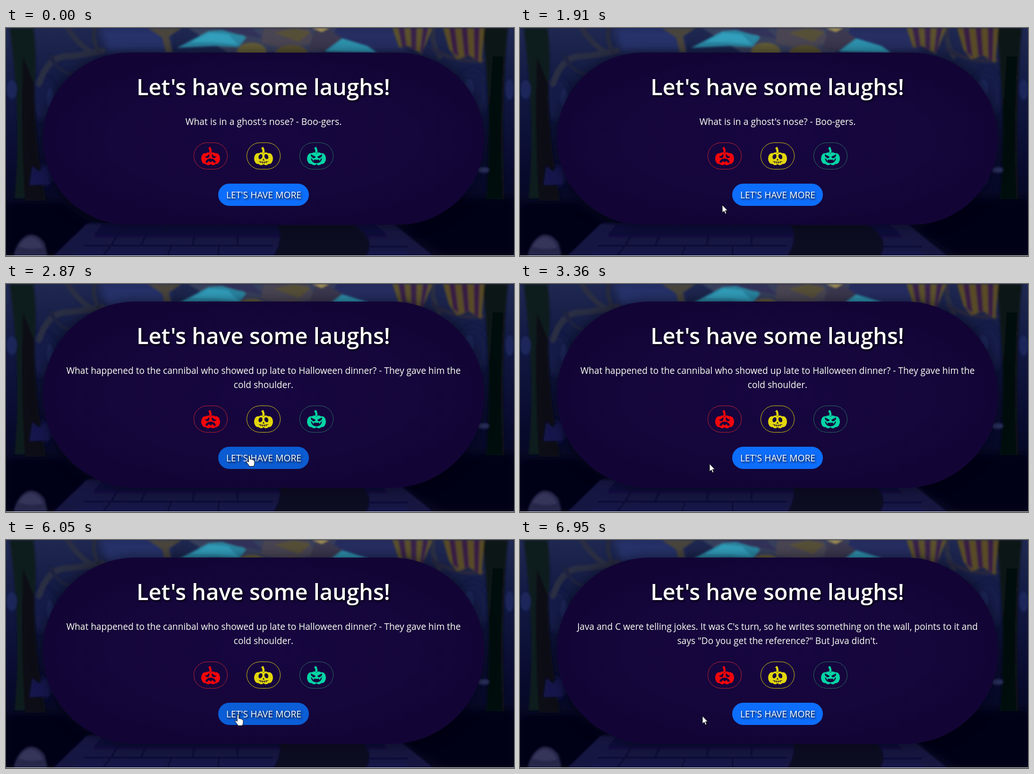
These frames come from a looping animation (1075 px wide and 482 px high, 8000 ms). An HTML page:

```html
<!DOCTYPE html>
<html lang="en">
<head>
<meta charset="utf-8">
<title>Halloween jokes</title>
<style>
html, body { margin: 0; width: 100%; height: 100%; overflow: hidden; background: #08092b; }
svg { display: block; width: 1075px; height: 482px; }
text { font-family: "Open Sans", "Noto Sans", sans-serif; text-anchor: middle; fill: #fff; }
#title { font-size: 47px; font-weight: 600; text-shadow: 2px 2px 4px #000; }
.joke { font-size: 19.1px; fill: #fffff4; }
#label { font-size: 19.3px; text-shadow: 2px 2px 4px #000; }
#panel { filter: drop-shadow(0 0 14px rgba(0, 0, 10, .55)); }
</style>
</head>
<body>
<svg viewBox="0 0 1075 482">
  <defs>
    <linearGradient id="night" x2="0" y2="1">
      <stop offset="0" stop-color="#1f2850"/>
      <stop offset=".3" stop-color="#101740"/>
      <stop offset=".65" stop-color="#080a2c"/>
      <stop offset=".85" stop-color="#05071e"/>
      <stop offset="1" stop-color="#070720"/>
    </linearGradient>
    <linearGradient id="road" x2="0" y2="1">
      <stop offset="0" stop-color="#0f0f38"/>
      <stop offset="1" stop-color="#161549"/>
    </linearGradient>
    <radialGradient id="velvet">
      <stop offset="0" stop-color="#170640"/>
      <stop offset=".7" stop-color="#15063b"/>
      <stop offset="1" stop-color="#120535"/>
    </radialGradient>
    <filter id="soft" x="0" y="0" width="100%" height="100%"><feGaussianBlur stdDeviation="2"/></filter>
    <filter id="haze" x="-20%" y="-20%" width="140%" height="140%"><feGaussianBlur stdDeviation="7"/></filter>
    <g id="pumpkin">
      <path d="M17 13Q19 7 15 3L19 0Q23 6 22 13Z"/>
      <ellipse cx="8.5" cy="25" rx="8.5" ry="11.5"/>
      <ellipse cx="31.5" cy="25" rx="8.5" ry="11.5"/>
      <ellipse cx="15" cy="25.5" rx="9" ry="13.5"/>
      <ellipse cx="25" cy="25.5" rx="9" ry="13.5"/>
    </g>
  </defs>

  <rect width="1075" height="482" fill="url(#night)"/>
  <g filter="url(#haze)">
    <path d="M200 0H345V50H215Z" fill="#26316a"/>
    <path d="M640 0H830L850 52H690Z" fill="#252e62"/>
    <ellipse cx="78" cy="150" rx="26" ry="45" fill="#131b48"/>
    <ellipse cx="988" cy="140" rx="32" ry="50" fill="#141c4a"/>
    <ellipse cx="75" cy="312" rx="24" ry="22" fill="#15164a"/>
    <ellipse cx="962" cy="318" rx="26" ry="22" fill="#141549"/>
    <path d="M0 370H120L190 420L110 482H0Z" fill="#040519"/>
    <path d="M840 425L960 360H1075V482H930Z" fill="#040519"/>
  </g>
  <g filter="url(#soft)">
    <!-- trees -->
    <g fill="none" stroke="#2b2d42" stroke-linecap="round">
      <path d="M70 118Q88 62 125 60T205 48" stroke-width="13"/>
      <path d="M128 -5Q148 32 182 52" stroke-width="11"/>
      <path d="M190 -5Q180 20 196 50" stroke="#252a3c" stroke-width="9"/>
      <path d="M95 60Q110 96 150 100" stroke="#1b2140" stroke-width="8"/>
      <path d="M905 -5Q898 25 918 62" stroke-width="10"/>
      <path d="M905 45Q955 75 1008 68" stroke="#252840" stroke-width="9"/>
    </g>
    <path d="M8 0H58Q66 60 60 120Q58 230 84 360H18Q34 200 8 0Z" fill="#0e1b1d"/>
    <path d="M36 60Q30 200 40 365H84Q60 230 60 120Z" fill="#081115"/>
    <path d="M1008 0H1062Q1048 130 1054 362H1016Q1030 180 1008 0Z" fill="#0a1219"/>
    <path d="M1030 60Q1020 220 1018 362H1050Q1044 200 1052 60Z" fill="#060b10"/>
    <g fill="#1c265a">
      <ellipse cx="12" cy="130" rx="11" ry="20"/>
      <ellipse cx="93" cy="148" rx="7" ry="20"/>
      <ellipse cx="980" cy="128" rx="10" ry="20"/>
      <ellipse cx="1066" cy="130" rx="9" ry="22"/>
      <path d="M50 332L56 292L70 304L86 290L92 330Z" fill="#17184e"/>
      <ellipse cx="1010" cy="300" rx="12" ry="6" fill="#2b305f"/>
    </g>
    <!-- market tents -->
    <path d="M300 0H372L345 18L352 52H338L330 20Z" fill="#49443c"/>
    <path d="M385 0H700L668 52H470Z" fill="#39405c"/>
    <path d="M362 42L428 7L482 3L508 20L492 40L440 38Z" fill="#2b86a3"/>
    <path d="M390 30L430 10L470 14L492 36L440 30Z" fill="#329fbc"/>
    <path d="M440 0H520L545 22L490 14Z" fill="#30315a"/>
    <path d="M545 0H640L655 30L600 45L540 32Z" fill="#4a4552"/>
    <path d="M568 10L610 0L645 8L620 30Z" fill="#575038"/>
    <ellipse cx="520" cy="51" rx="31" ry="20" fill="#635d35"/>
    <ellipse cx="604" cy="54" rx="34" ry="18" fill="#57502f"/>
    <path d="M655 0H680L712 22L672 50L640 44Z" fill="#3a3750"/>
    <path d="M674 50L712 22L765 38L785 52Z" fill="#2f94b0"/>
    <path d="M648 0H684L668 8Z" fill="#a29152"/>
    <path d="M818 0H902L880 55L850 38L832 42Z" fill="#5c512c"/>
    <path d="M830 0H843L848 40H838ZM856 0H869L868 46H858ZM882 0H894L882 52H876Z" fill="#39204a"/>
    <path d="M925 0H1012L1006 74L980 58L955 66L938 45Z" fill="#584c27"/>
    <path d="M938 0H950L958 62L946 52ZM964 0H976L980 58L970 60ZM990 0H1002L1000 70L991 64Z" fill="#391a42"/>
    <!-- road -->
    <path d="M175 412H800L885 482H110Z" fill="url(#road)"/>
    <path d="M170 414L205 414L145 482H100Z" fill="#171842"/>
    <path d="M780 414H820L905 482H860Z" fill="#171740"/>
    <path d="M572 416H735Q785 445 762 482H565Q590 445 572 416Z" fill="#090820"/>
    <path d="M190 432H570M165 460H565M255 414L240 432L222 460L205 482M345 414L335 432M300 432L285 460M400 432L395 460M350 460L342 482M455 414V432M490 432V460M450 460V482M765 436H800M770 462H850"
      fill="none" stroke="#0b0b30" stroke-width="3"/>
    <path d="M16 482Q22 450 45 438Q66 432 82 455L88 482Z" fill="#25264a"/>
    <path d="M26 462Q38 442 55 442Q70 446 78 464Q50 470 26 462Z" fill="#35365a"/>
  </g>

  <rect id="panel" x="78" width="934" fill="url(#velvet)"/>
  <g id="upper">
    <text id="title" x="544.5" y="142">Let's have some laughs!</text>
    <text class="joke" x="545" y="205"></text>
    <text class="joke" x="545" y="235"></text>
  </g>
  <g id="lower">
    <g id="votes"></g>
    <rect id="button" x="449" y="329" width="192" height="47" rx="23.5"/>
    <text id="label" x="545.5" y="360">LET'S HAVE MORE</text>
  </g>
  <path id="cursor" stroke="#000" stroke-width="1" fill="#fff" stroke-linejoin="round"/>
  <rect y="481" width="1075" height="1" fill="#fff"/>
</svg>
<script>
const $ = id => document.getElementById(id);
const DARK = '#16073d';

const faces = [
  ['#f2060a', '#c3212d', `<path d="M8 21Q14 20 17 15Q19 22 14 24Q10 24 8 21ZM32 21Q26 20 23 15Q21 22 26 24Q30 24 32 21Z"/>
    <path d="M9 33Q11 25 20 25Q29 25 31 33L27 34L24 30L20 33L16 30L13 34Z"/>`],
  ['#e2d70c', '#dcc80e', `<ellipse cx="13.5" cy="21" rx="4" ry="5.5" transform="rotate(20 13.5 21)"/>
    <ellipse cx="26" cy="21" rx="4" ry="5.5" transform="rotate(-20 26 21)"/><path d="M20 25L22 29H18Z"/>
    <path d="M10 31Q20 35 30 31M14 30V35M18 31V36M22 31V36M26 30V35" fill="none" stroke="${DARK}"/>`],
  ['#05d5a5', '#26705f', `<path d="M8 16L18 21Q17 25 13 24Q8 22 8 16ZM32 16L22 21Q23 25 27 24Q32 22 32 16Z"/>
    <path d="M8 24L11 26L13 30L15 27Q20 28 25 27L27 30L29 26L32 24Q30 35 20 35Q10 35 8 24Z"/>`]
];
$('votes').innerHTML = faces.map(([color, ring, face], i) => `
  <g transform="translate(${397 + 112 * i} 242)">
    <rect x=".5" y=".5" width="71" height="56" rx="28" fill="none" stroke="${ring}"/>
    <g transform="translate(16 9)"><use href="#pumpkin" fill="${color}"/><g fill="${DARK}">${face}</g></g>
  </g>`).join('');

const LOOP = 8000;
// each joke arrives a moment after the press
const jokes = [
  [0, "What is in a ghost's nose? - Boo-gers.", ''],
  [2870, 'What happened to the cannibal who showed up late to Halloween dinner? - They gave him the', 'cold shoulder.'],
  [6550, "Java and C were telling jokes. It was C's turn, so he writes something on the wall, points to it and",
    'says "Do you get the reference?" But Java didn\'t.']
];
const hovers = [[1993, 3136], [5771, 6742]];
const presses = [[2700, 2780], [6380, 6460]];
// pointer stops: time, x, y
const stops = [
  [1070, 360, 484], [1480, 428, 374], [1910, 428, 374], [2300, 515, 362], [2950, 515, 362],
  [3360, 401, 380], [5570, 401, 380], [6050, 491, 369], [6640, 491, 369], [6950, 386, 372], [LOOP, 386, 372]
];
const ARROW = 'M0 0V16.5L3.8 13L6.4 19L9 18L6.5 12H11.5Z';
const HAND = 'M-1.8 1Q0 -1 1.8 1V8.5Q5 7.5 5.5 9.5Q8 8.5 8.5 10.5Q11 10 11 12.5V17Q11 20 9 23.5H0Q-2 19 -6 15Q-6.5 12 -4 12.5L-1.8 14.5Z';
const [line1, line2] = document.querySelectorAll('.joke');

const clamp = v => Math.min(1, Math.max(0, v));
const mix = (a, b, u) => a + (b - a) * u;

// 150 ms fade in and out around each span
const fade = (spans, t) =>
  spans.reduce((sum, [on, off]) => sum + clamp((t - on) / 150) - clamp((t - off) / 150), 0);

function pointer(t) {
  const i = stops.findIndex(s => s[0] > t);
  if (i < 1) return [360, 500];
  const [a, b] = [stops[i - 1], stops[i]];
  const u = ((t - a[0]) / (b[0] - a[0])) ** .75, e = u * u * (3 - 2 * u);
  return [mix(a[1], b[1], e), mix(a[2], b[2], e)];
}

function draw(t) {
  const [, first, second] = jokes.filter(j => j[0] <= t).pop();
  const shift = second ? 15 : 0;
  line1.textContent = first;
  line1.style.fontSize = second ? '' : '19.3px';
  line2.textContent = second;
  $('upper').setAttribute('transform', `translate(0 ${-shift})`);
  $('lower').setAttribute('transform', `translate(0 ${shift})`);
  $('panel').setAttribute('y', 52 - shift);
  $('panel').setAttribute('height', 364 + 2 * shift);
  $('panel').setAttribute('rx', 182 + shift);

  const glow = fade(hovers, t), push = fade(presses, t);
  $('button').setAttribute('fill',
    `rgb(${13 - 2 * glow - push} ${110 - 16 * glow - 6 * push} ${253 - 38 * glow - 13 * push})`);

  const over = hovers.some(([on, off]) => t >= on && t < off);
  const [x, y] = pointer(t).map(Math.round);
  $('cursor').setAttribute('d', over ? HAND : ARROW);
  $('cursor').setAttribute('transform', `translate(${x} ${y})`);
}

const start = performance.now();
function tick() {
  draw((performance.now() - start) % LOOP);
  requestAnimationFrame(tick);
}
tick();
</script>
</body>
</html>
```
